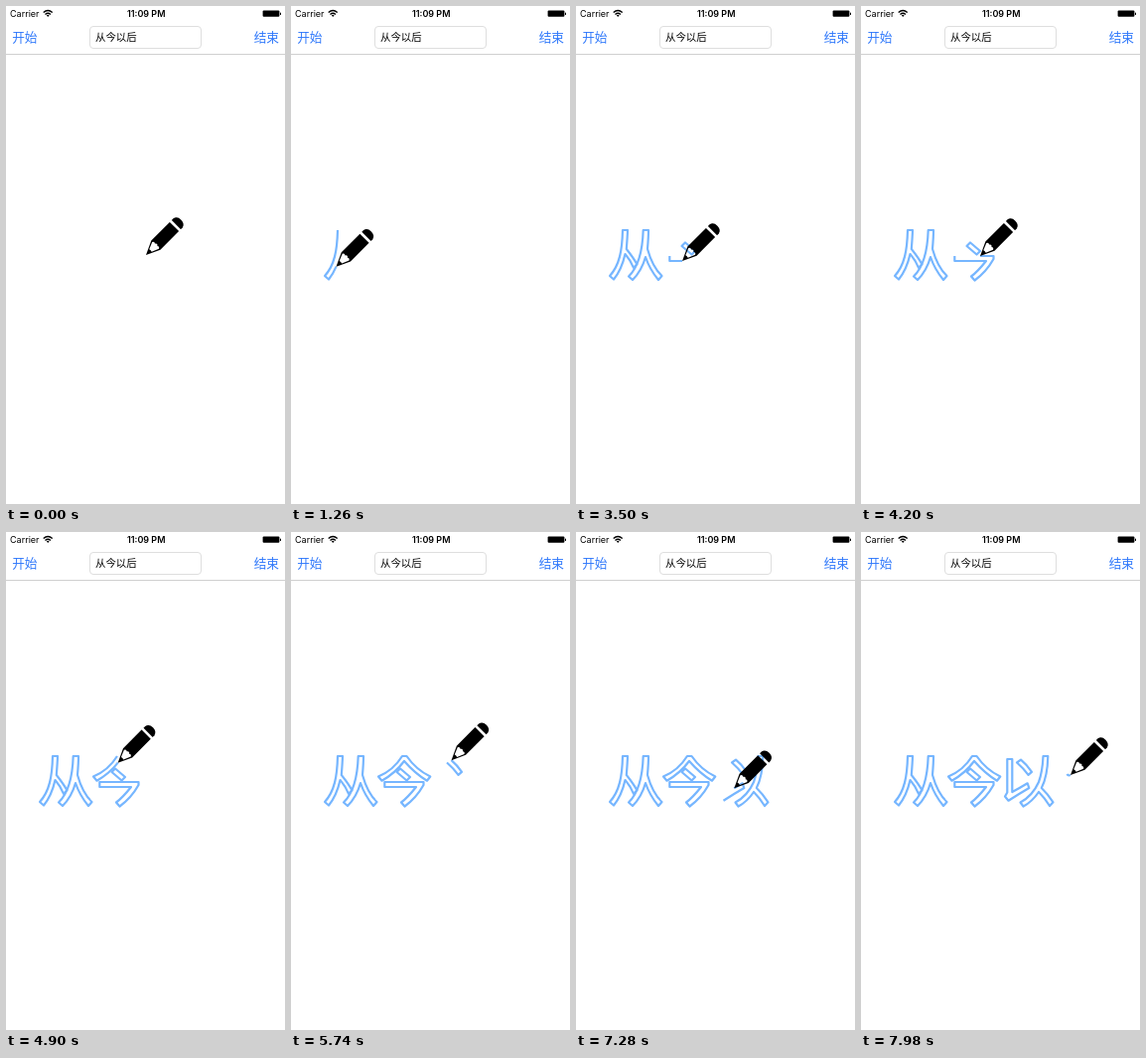
An HTML page for the animation above (8000 ms loop, 281 px wide and 500 px high).

```html
<!DOCTYPE html>
<html lang="zh">
<head>
<meta charset="utf-8">
<title>Handwriting</title>
<style>
  html, body { margin: 0; width: 100%; height: 100%; overflow: hidden; background: #fff; }
  svg { display: block; width: 100%; height: 100%; }
  .latin { font: 9px Inter, "Liberation Sans", sans-serif; }
  .time { font-weight: 600; text-anchor: middle; }
  .cjk { font-family: "Noto Sans CJK SC", "Noto Sans CJK", sans-serif; }
  .button { font-size: 12.7px; fill: #2f78fb; }
  #ink path { fill: none; stroke: #76b6ff; stroke-width: 2.2; stroke-linejoin: round; }
</style>
</head>
<body>
<svg viewBox="0 0 281 500">
  <text class="latin" x="4" y="11">Carrier</text>
  <g fill="none" stroke="#000" stroke-width="1.4">
    <path d="M37.7 6.6Q42.2 2.6 46.7 6.6M39.5 8.4Q42.2 6 44.9 8.4"/>
    <path d="M40.8 9.3Q42.2 8.2 43.6 9.3L42.2 10.9Z" fill="#000" stroke="none"/>
  </g>
  <text class="latin time" x="141.2" y="11">11:09 PM</text>
  <rect x="258.6" y="4.4" width="16.8" height="6.4" rx="1"/>
  <rect x="276" y="6.4" width="1" height="2.6" rx=".5"/>

  <path d="M0 48.5H281" stroke="#d0d0d0"/>
  <text id="start" class="cjk button" x="6.2" y="36">开始</text>
  <text class="cjk button" x="249.7" y="36">结束</text>
  <rect x="84.5" y="20.5" width="112" height="22" rx="3.5" fill="#fff" stroke="#dedede"/>
  <text class="cjk" x="90" y="34.8" font-size="10.4">从今以后</text>

  <g id="ink"></g>
  <g id="pencil">
    <path fill-rule="evenodd" d="M0 0L14 -6.5H40.3V6.5H14ZM6.3 -1.7L13.6 -4.8Q16 -3.5 14.4 -1.7Q17 0 14.4 1.7Q16 3.5 13.6 4.8L6.3 1.7Q7 0 6.3 -1.7Z"/>
    <path d="M43 -6.5H45.5Q50 -5.5 50 0Q50 5.5 45.5 6.5H43Z"/>
  </g>
</svg>
<script>
const LOOP = 8000, STEP = 70, TAP = 630, BEGIN = 770;
const REST = { x: 141, y: 250 };

// Glyph outlines in writing order
const outlines = [
  "M47 225C46.5 245 44 260 34 271L38 274.5C44 267 47.5 258 49.5 249C53 253 56 258 58 262.8L61.4 259.3C58.5 254 54 248 50.8 244C51.3 238 51.8 232 52 225Z",
  "M67.7 225C67 247 63 262 53 271.5L57 275C63 269 67.5 261 70 252C73 261 78 269 83 275L86.5 271C79 264 74.5 253 72 244C72.5 238 73 231 73 225Z",
  "M106.5 241L116.5 249.5L120 246L110 237.5Z",
  "M94.3 251V256H126C122 261 117 267 111 271.5L114.5 275.5C122 270 129 262 133.5 254V251Z",
  "M112 225C107 233 99 241 88 245.5L91.5 249.7C100 245 108 238 114 230C121 238 129 245 137 249.7L140.3 245.5C131 241 122 233 116.5 225Z",
  "M157 231.5C161 235 165 239 168.5 243.8L172 240.8C169 236.5 165 232 161 228.7Z",
  "M179 261C183 265 187 270 190 275L193.5 271.3C190 266 186 261 181.8 257C186 249 188 239 188.3 225H183.5C183 235 182 243 179 251C175 260 169 267 160.5 271.5L163.5 275.5C170 272 175 267 179 261Z",
  "M148.5 269.7Q159 263 169.3 257L167.7 252.3Q160 257 152.3 261V228H147.3V261.5L145 265.5Z",
  "M207.5 243Q208.5 245 211 244"
];

// Pen position at known times: time, outline, x, y
const marks = [
  [735, 0, 47, 225], [1260, 0, 46, 262], [2310, 1, 65, 267], [3500, 3, 107, 256],
  [4900, 4, 112.5, 231.5], [6580, 6, 179, 251], [7980, 8, 211, 244]
];

const ink = document.getElementById("ink");
const pencil = document.getElementById("pencil");
const startButton = document.getElementById("start");

let total = 0;
const strokes = outlines.map(d => {
  const el = document.createElementNS("http://www.w3.org/2000/svg", "path");
  el.setAttribute("d", d);
  ink.append(el);
  const length = el.getTotalLength();
  const stroke = { el, length, from: total };
  total += length;
  return stroke;
});

function nearestLength({ el, length }, x, y) {
  let best = 0, least = Infinity;
  for (let s = 0; s < length + .25; s += .25) {
    const p = el.getPointAtLength(s);
    const gap = Math.hypot(p.x - x, p.y - y);
    if (gap < least) { least = gap; best = Math.min(s, length); }
  }
  return best;
}

const pace = marks.map(([t, i, x, y]) => [t, strokes[i].from + nearestLength(strokes[i], x, y)]);

function drawnLength(t) {
  const i = Math.max(1, pace.findIndex(([end]) => t <= end));
  const [t0, s0] = pace[i - 1], [t1, s1] = pace[i];
  return s0 + (s1 - s0) * (t - t0) / (t1 - t0);
}

function buttonOpacity(t) {
  if (t < TAP) return 1;
  if (t < BEGIN) return .25;
  return Math.min(1, .25 + .75 * (t - BEGIN) / 350);
}

function render(time) {
  const t = Math.floor(time / STEP) * STEP;
  const drawn = t < BEGIN ? 0 : drawnLength(t);
  let tip = REST;
  for (const { el, length, from } of strokes) {
    const part = Math.min(length, drawn - from);
    el.style.display = part > 0 ? "" : "none";
    if (part <= 0) continue;
    el.setAttribute("stroke-dasharray", part < length ? `${part} ${length + 9}` : "none");
    tip = el.getPointAtLength(part);
  }
  pencil.setAttribute("transform", `translate(${tip.x} ${tip.y}) rotate(-45)`);
  startButton.setAttribute("opacity", buttonOpacity(t));
}

const origin = performance.now();
function tick() {
  render((performance.now() - origin) % LOOP);
  requestAnimationFrame(tick);
}
tick();
</script>
</body>
</html>
```
